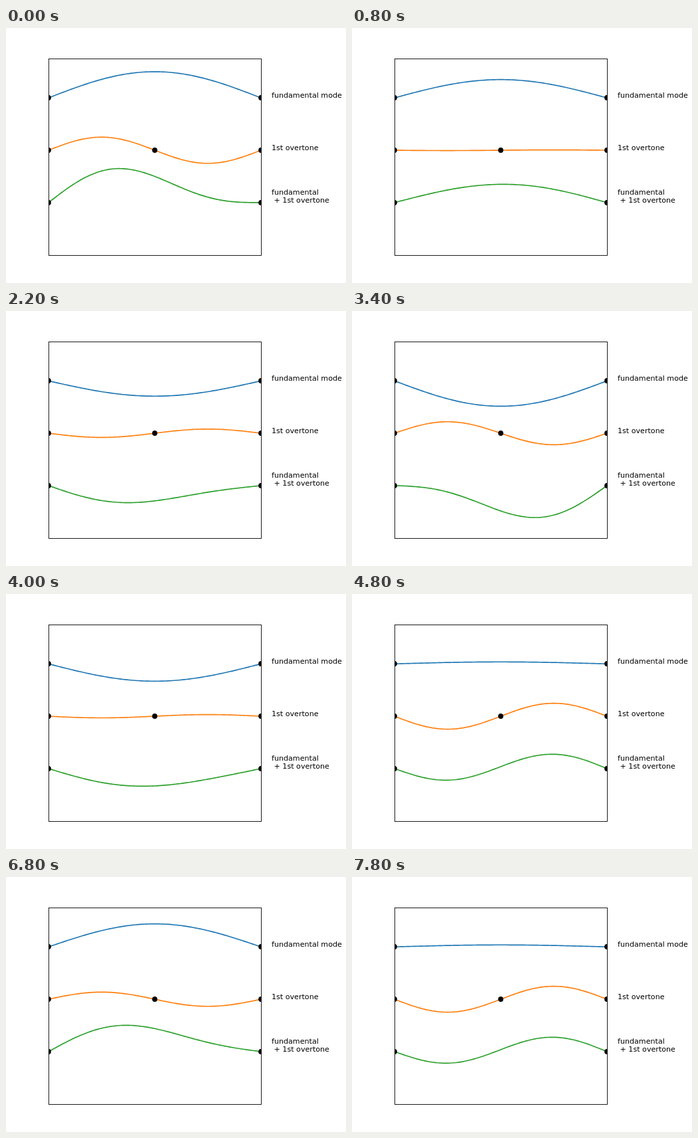
An HTML page with a canvas for the animation above (8000 ms loop, 512 px wide and 384 px high).

```html
<!DOCTYPE html>
<html lang="en">
<head>
<meta charset="utf-8">
<title>Standing waves</title>
<style>
  html, body { margin: 0; width: 100%; height: 100%; overflow: hidden; background: #fff; }
  canvas { display: block; }
</style>
</head>
<body>
<canvas id="stage" width="512" height="384"></canvas>
<script>
const ctx = document.getElementById('stage').getContext('2d');

const LOOP = 8000, STEP = 200;
const PHASE_STEP = 4 * Math.PI / 63;
const LEFT = 64, TOP = 46, WIDTH = 320, HEIGHT = 296;
const UNIT = 78.848;          // pixels per data unit
const SAMPLES = 100;          // the curves stop one sample short of the right edge

const fundamental = (x, p) => 0.5 * Math.sin(Math.PI * x) * Math.cos(p);
const overtone = (x, p) => 0.25 * Math.sin(2 * Math.PI * x) * Math.cos(2 * p);

const waves = [
  { y: 105.216, color: '#1f77b4', nodes: [0, 1], shape: fundamental },
  { y: 184.064, color: '#ff7f0e', nodes: [0, 0.5, 1], shape: overtone },
  { y: 262.912, color: '#2ca02c', nodes: [0, 1],
    shape: (x, p) => fundamental(x, p) + overtone(x, p) },
];

const labels = [
  ['fundamental mode', 105],
  ['1st overtone', 184],
  ['fundamental', 251],
  [' + 1st overtone', 263],
];

function drawCurve({ y, color, shape }, phase) {
  ctx.beginPath();
  for (let i = 0; i < SAMPLES; i++) {
    const x = i / SAMPLES;
    ctx.lineTo(LEFT + x * WIDTH, y - UNIT * shape(x, phase));
  }
  ctx.strokeStyle = color;
  ctx.lineWidth = 1.667;
  ctx.lineCap = 'square';
  ctx.lineJoin = 'round';
  ctx.stroke();
}

function drawNodes({ y, nodes }) {
  for (const x of nodes) {
    ctx.beginPath();
    ctx.arc(LEFT + x * WIDTH, Math.floor(y + 0.5), 3.89, 0, 2 * Math.PI);
    ctx.fill();
  }
}

function draw(time) {
  const phase = Math.floor(time % LOOP / STEP) * PHASE_STEP;
  ctx.fillStyle = '#fff';
  ctx.fillRect(0, 0, 512, 384);
  ctx.fillStyle = '#000';

  ctx.save();
  ctx.beginPath();
  ctx.rect(LEFT, TOP, WIDTH, HEIGHT);
  ctx.clip();
  for (const wave of waves) drawCurve(wave, phase);
  waves.forEach(drawNodes);
  ctx.restore();

  ctx.strokeStyle = '#000';
  ctx.lineWidth = 0.89;
  ctx.strokeRect(LEFT + 0.5, TOP + 0.5, WIDTH, HEIGHT);

  ctx.font = '11.11px "DejaVu Sans", sans-serif';
  for (const [text, y] of labels) ctx.fillText(text, 400, y);
}

const start = performance.now();
function tick() {
  draw(performance.now() - start);
  requestAnimationFrame(tick);
}
tick();
</script>
</body>
</html>
```
